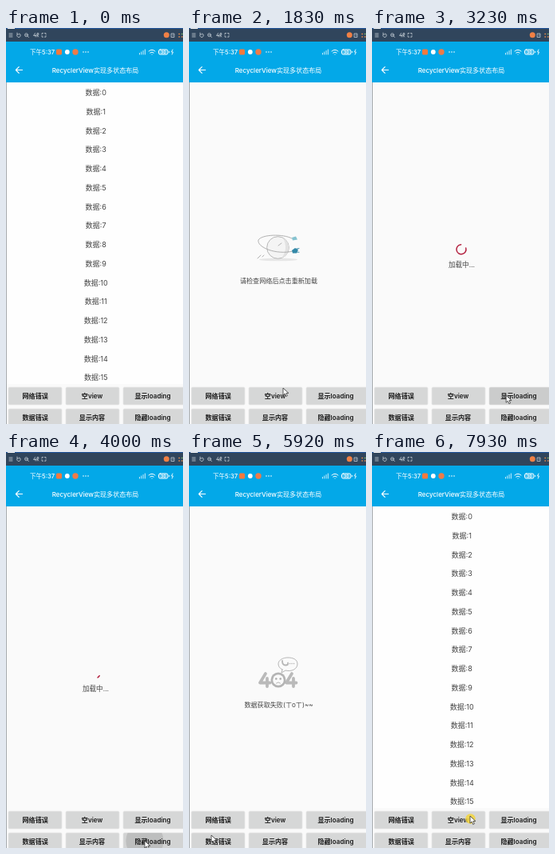
An HTML page for the animation above (8000 ms loop, 222 by 495 pixels).

```html
<!DOCTYPE html>
<html lang="zh-CN">
<head>
<meta charset="utf-8">
<title>RecyclerView</title>
<style>
html, body { margin: 0; width: 100%; height: 100%; overflow: hidden; background: #fafafa; }
svg { display: block; width: 100vw; height: 100vh; }
text { font: 8.1px Inter, "Noto Sans CJK SC", "Noto Sans CJK", sans-serif; fill: #444; text-anchor: middle; }
#buttons text { font-weight: 600; fill: #1c1c1c; }
#list text { font-size: 9px; }
.line { fill: none; stroke-linecap: round; stroke-linejoin: round; }
</style>
</head>
<body>
<svg viewBox="0 0 222 495">
  <rect width="222" height="495" fill="#fafafa"/>

  <g id="list"><rect y="68" width="222" height="377" fill="#fefefe"/></g>

  <g id="offline">
    <ellipse cx="112" cy="289.500" rx="24" ry="1.800" fill="#e6e6e6"/>
    <circle cx="111.500" cy="274.500" r="13.800" fill="#f4f4f4" stroke="#b0b0b0" stroke-width=".9"/>
    <path d="M118 262.500a13.800 13.800 0 0 1-2 25q9-11 2-25" fill="#e2e2e2"/>
    <g class="line" stroke="#a9a9a9" stroke-width=".9">
      <path d="M129 263C118 257 91 258 87 265C85 274 109 284 130 279"/>
      <path d="M86 288l4-4M92 286l2-2M112 272l4-3"/>
    </g>
    <path d="M129 262l5-1.500 2 4-6 1z" fill="#86c3d0"/>
    <path d="M129 278l4-3 4 2-2 4.500-5 0z" fill="#3489a8"/>
    <path class="line" d="M135 276l3-.5M135 280l3 .3" stroke="#3489a8" stroke-width=".9"/>
    <text x="112.500" y="318.500">请检查网络后点击重新加载</text>
  </g>

  <g id="loading">
    <path id="arc" class="line" stroke="#b3203f" stroke-width="1.500"/>
    <text x="112.500" y="299" style="font-size:8.600px">加载中...</text>
  </g>

  <g id="failed">
    <g class="line" stroke="#bababa" stroke-width="3.800">
      <path d="M96 277l-7 11.500h12.500M98 283v10M129 277l-7 11.500h12.500M131 283v10"/>
    </g>
    <circle cx="112" cy="285" r="9.500" fill="#b4b4b4"/>
    <circle cx="112" cy="285" r="6.800" fill="#fafafa"/>
    <g fill="#aaa"><circle cx="109.300" cy="283.500" r="1.300"/><circle cx="114.700" cy="283.500" r="1.300"/></g>
    <g class="line" stroke="#b6b6b6">
      <path d="M109.500 289q2.500-2.500 5 0"/>
      <path d="M117 272l-1 4 5-3c8 2 15-2 15-8s-6-8-12-8-12 3-12 8c0 3 2 5.500 5 7z"/>
      <path d="M117 261q0 5.500 4 5.500t3-3" stroke-width="1.800"/>
      <path d="M126.500 264.500h.1M129 264.500h.1M131.500 264.500h.1" stroke-width="1.500"/>
    </g>
    <text x="112.500" y="318.500">数据获取失败(ㄒoㄒ)~~</text>
  </g>

  <g id="buttons"></g>

  <rect y="16" width="222" height="52" fill="#03a8e8"/>
  <rect width="222" height="17" fill="#30455c"/>
  <rect width="222" height="1" fill="#24589f"/>
  <rect x="2" width="9" height="1" fill="#fff"/>
  <g class="line" stroke="#c3ccd4" stroke-width=".8">
    <path d="M4 7h4M4 9h4M4 11h4"/>
    <path d="M14 8a2.300 2.300 0 1 0 2.500-1M14 6v2h2"/>
    <circle cx="25.500" cy="8.700" r="2"/><path d="M27 10.200l1.500 1.500M24.800 8.700h1.500"/>
    <path d="M36.500 6.500l-2 3h3M37 8.500v2.500M39 11v-4.500h1.800v2.200h-1.800l1.800 2.300"/>
    <path d="M45 8v-1.500h1.500M48.500 6.500h1.500v1.500M50 9.700v1.500h-1.500M46.500 11.200h-1.500v-1.500"/>
    <path d="M207.500 7h3.500v4.500h-3.500zM209 9h1"/>
  </g>
  <g class="line" stroke-width="1.500">
    <path d="M217 7.500h.5M217 11h.5M220.500 11h.5" stroke="#e88a4a"/>
    <path d="M220.500 7.500h.5" stroke="#7fb56a"/>
  </g>
  <circle cx="201.300" cy="8.800" r="3.500" fill="#f08045"/>

  <text x="45.500" y="33" style="fill:#fff;font-size:7.600px;font-weight:500">下午5:37</text>
  <rect x="63" y="26.500" width="7" height="7" rx="1.500" fill="#f4793d"/>
  <circle cx="76.800" cy="30" r="2.900" fill="#fff"/>
  <circle cx="87" cy="30" r="3.700" fill="#ee7b49"/>
  <g fill="#fff"><circle cx="97" cy="30" r=".8"/><circle cx="100" cy="30" r=".8"/><circle cx="103" cy="30" r=".8"/></g>
  <g class="line" stroke="#fff" stroke-width="1">
    <path d="M167.500 33v-1.500M169.800 33v-3M172.100 33v-4.500M174.400 33v-6" stroke-opacity=".8"/>
    <path d="M179 29q4-3.500 8 0M180.700 31q2.300-2 4.600 0M183 33h.1"/>
    <rect x="191.500" y="27" width="11.500" height="6" rx="1.800" fill="#fff" fill-opacity=".25"/><path d="M204.800 29.500v1"/>
    <path d="M209 27l-1.500 3h2l-1.300 3" stroke-width=".9"/>
    <path d="M20.500 52.500h-8m3.700-3.800l-3.800 3.800 3.800 3.800" stroke-width="1.200"/>
  </g>
  <text x="197.200" y="32" style="fill:#fff;font-size:5px;font-weight:600">30</text>
  <text x="112" y="55.800" style="fill:#fff;font-size:8.050px;font-weight:500">RecyclerView实现多状态布局</text>
  <path d="M.4 68V495" stroke="#858a8f" stroke-width=".8"/>

  <g id="cursor">
    <circle id="press" cx=".5" cy="3.500" r="6.200" fill="#f3d63d" fill-opacity=".85"/>
    <path d="M0 0v9l2.200-2 1.500 3.500 1.700-.8-1.500-3.300h3z" fill="#fff" stroke="#333" stroke-width=".8"/>
  </g>
</svg>
<script>
const LOOP = 8000;
const $ = id => document.getElementById(id);
const clamp = v => Math.max(0, Math.min(1, v));
const ease = v => { v = clamp(v); return v * v * (3 - 2 * v); };

function add(parent, tag, attrs, label = '') {
  const el = document.createElementNS('http://www.w3.org/2000/svg', tag);
  for (const k in attrs) el.setAttribute(k, attrs[k]);
  el.textContent = label;
  parent.append(el);
  return el;
}

for (let i = 0; i < 16; i++)
  add($('list'), 'text', { x: 112.7, y: 84.3 + i * 23.73 }, '数据:' + i);

const labels = ['网络错误', '空view', '显示loading', '数据错误', '显示内容', '隐藏loading'];
const buttons = labels.map((label, i) => {
  const col = i % 3, low = i > 2;
  const box = { x: [3, 75, 147][col], y: low ? 476 : 449, width: [67, 67, 76][col], height: 22, rx: 1.5 };
  const g = $('buttons');
  add(g, 'rect', { ...box, fill: '#d6d7d7', stroke: '#e6e6e6', 'stroke-width': .8 });
  add(add(g, 'clipPath', { id: 'clip' + i }), 'rect', box);
  const ripple = add(g, 'g', { 'clip-path': `url(#clip${i})` });
  const shade = add(ripple, 'rect', { ...box, 'fill-opacity': .03 });
  const wave = add(ripple, 'circle', { 'fill-opacity': .1 });
  add(g, 'text', { x: [36.7, 108, 184][col], y: low ? 490.3 : 462.8 }, label);
  return { ripple, shade, wave };
});

// time, button
const clicks = [[740, 0], [2800, 2], [3930, 5], [5400, 3], [6650, 4], [8000, 1]];
// time, view
const views = [[0, 'list'], [870, 'offline'], [2880, 'loading'], [4080, 'list'], [5490, 'failed'], [6820, 'list']];
// time, x, y of the pointer tip
const path = [
  [70, 96, 482], [540, 59, 455], [1100, 59, 455], [1500, 118, 450], [1830, 118, 450],
  [2540, 167.5, 456], [3100, 167.5, 456], [3750, 174, 486], [4080, 174, 486],
  [4420, 117, 485], [4570, 115.5, 485], [4770, 115.5, 485], [5050, 28, 479],
  [6060, 28, 479], [6560, 108, 484], [7250, 108, 484], [7880, 123, 455], [LOOP, 123, 455]
];

function tip(t) {
  const i = Math.max(1, path.findIndex(p => p[0] > t));
  const [a, b] = t < LOOP ? [path[i - 1], path[i]] : path.slice(-2);
  const k = ease((t - a[0]) / (b[0] - a[0]));
  return [a[1] + (b[1] - a[1]) * k, a[2] + (b[2] - a[2]) * k];
}

function drawSpinner(t) {
  const turns = (t - 2670) / 1333, p = turns - Math.floor(turns);
  const base = 144 * turns + 90 * p - 99;
  const from = base + 270 * ease(p * 2 - 1) - 15;
  const to = base + 270 * ease(p * 2) + 15;
  const at = deg => {
    const r = deg * Math.PI / 180;
    return `${112 + 6 * Math.cos(r)} ${276.7 + 6 * Math.sin(r)}`;
  };
  $('arc').setAttribute('d', `M${at(from)}A6 6 0 ${to - from > 180 ? 1 : 0} 1 ${at(to)}`);
}

function draw(t) {
  const view = views.filter(v => v[0] <= t).pop()[1];
  for (const id of ['list', 'offline', 'loading', 'failed'])
    $(id).style.display = id === view ? '' : 'none';
  drawSpinner(t);

  for (const [start, i] of clicks) {
    const age = t - start, { ripple, shade, wave } = buttons[i];
    const [x, y] = tip(start);
    ripple.style.opacity = age < 0 ? 0 : 1 - clamp((age - 240) / 300);
    shade.style.opacity = clamp(age / 120);
    wave.setAttribute('cx', x);
    wave.setAttribute('cy', y);
    wave.setAttribute('r', 8 + .22 * Math.max(0, age));
  }

  $('cursor').style.display = t < 70 ? 'none' : '';
  $('cursor').setAttribute('transform', `translate(${tip(t)})`);
  $('press').style.display = clicks.some(([s]) => t >= s - 75 && t < s) ? '' : 'none';
}

const begin = performance.now();
function frame() {
  draw((performance.now() - begin) % LOOP);
  requestAnimationFrame(frame);
}
frame();
</script>
</body>
</html>
```
